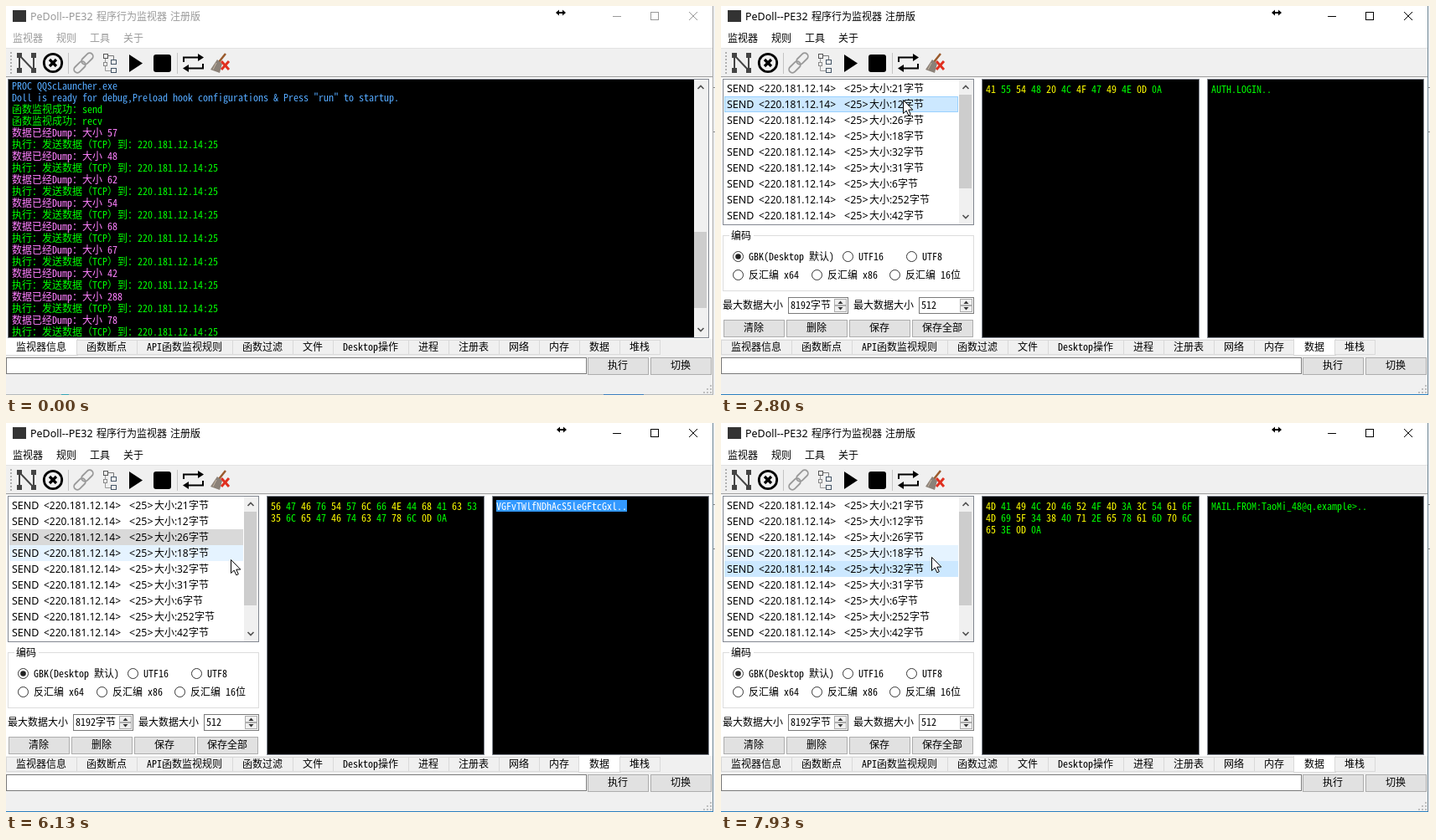
An HTML page with a canvas for the animation above (8 s loop, 846 by 465 pixels).

```html
<!DOCTYPE html>
<html lang="zh-CN">
<head>
<meta charset="utf-8">
<title>PeDoll</title>
<style>
html, body { margin: 0; width: 100%; height: 100%; overflow: hidden; background: #f0f0f0; }
canvas { display: block; }
</style>
</head>
<body>
<canvas id="stage" width="846" height="465"></canvas>
<script>
const ctx = document.getElementById('stage').getContext('2d');
const LOOP = 8000, TICK = 1000 / 15;
const CJK = '12px "Noto Sans CJK SC", "Noto Sans CJK", sans-serif';
const UI = '12px "Noto Sans", "Open Sans", sans-serif';
const TITLE = '12.5px "Noto Sans", "Open Sans", sans-serif';
const MONO = halfWidthFont();

const EMAIL = 'TaoMi_48@q.example';
const LOGIN = 'AUTH LOGIN\r\n';
const USER = btoa(EMAIL) + '\r\n';
const MAIL = `MAIL FROM:<${EMAIL}>\r\n`;
const TABS = ['监视器信息', '函数断点', 'API函数监视规则', '函数过滤', '文件', 'Desktop操作',
  '进程', '注册表', '网络', '内存', '数据', '堆栈'];
const DUMPS = [57, 48, 62, 54, 68, 67, 42, 288, 78];
const PACKETS = [21, 12, 26, 18, 32, 31, 6, 252, 42];

// pointer stops: tick, x, y
const PATH = [[6, 773, 470], [15, 710, 413], [29, 710, 413], [42, 217, 112], [55, 217, 112],
  [59, 217, 134], [70, 217, 134], [80, 777, 100], [81, 777, 100], [86, 554, 104],
  [89, 554, 104], [92, 268, 163], [99, 247, 173], [104, 247, 173], [109, 757, 108],
  [114, 420, 205], [117, 250, 184], [119, 251, 160]];

let pointer = { x: 0, y: 0 };

// the CJK mono face has 6 px Latin letters at 12 px; without it use a smaller mono face
function halfWidthFont() {
  const cjkMono = '12px "Noto Sans Mono CJK SC", monospace';
  ctx.font = cjkMono;
  return Math.abs(ctx.measureText('M').width - 6) < .1 ? cjkMono : '10px "DejaVu Sans Mono", monospace';
}

function pointerAt(tick) {
  const i = PATH.findIndex(p => p[0] >= tick);
  if (i <= 0) return { x: PATH[0][1], y: PATH[0][2] };
  const [t0, x0, y0] = PATH[i - 1], [t1, x1, y1] = PATH[i];
  const u = (tick - t0) / (t1 - t0), e = u * u * (3 - 2 * u);
  return { x: Math.round(x0 + (x1 - x0) * e), y: Math.round(y0 + (y1 - y0) * e) };
}

const over = (x, y, w, h) =>
  pointer.x >= x && pointer.x < x + w && pointer.y >= y && pointer.y < y + h;

function rect(x, y, w, h, color) {
  ctx.fillStyle = color;
  ctx.fillRect(x, y, w, h);
}

function box(x, y, w, h, fill, border) {
  rect(x, y, w, h, border);
  rect(x + 1, y + 1, w - 2, h - 2, fill);
}

function line(points, color, width = 1, close = false) {
  ctx.beginPath();
  points.forEach(([x, y]) => ctx.lineTo(x, y));
  if (close) ctx.closePath();
  ctx.strokeStyle = color;
  ctx.lineWidth = width;
  ctx.stroke();
}

function poly(points, color) {
  ctx.beginPath();
  points.forEach(([x, y]) => ctx.lineTo(x, y));
  ctx.fillStyle = color;
  ctx.fill();
}

function ring(x, y, r, color, width, fill) {
  ctx.beginPath();
  ctx.arc(x, y, r, 0, 7);
  if (fill) { ctx.fillStyle = fill; ctx.fill(); }
  ctx.strokeStyle = color;
  ctx.lineWidth = width;
  ctx.stroke();
}

function put(str, x, y, color, font) {
  ctx.font = font;
  ctx.fillStyle = color;
  ctx.fillText(str, x, y);
}

// fixed grid text: 12 px ideographs, 6 px Latin
const cells = str => [...str].reduce((w, c) => w + (c < '\x80' ? 6 : 12), 0);

function text(str, x, y, color = '#000') {
  for (const run of str.match(/[\x00-\x7f]+|[^\x00-\x7f]+/g)) {
    put(run, x, y, color, run[0] < '\x80' ? MONO : CJK);
    x += cells(run);
  }
}

function button(label, x, y, w, h) {
  const hot = over(x, y, w, h);
  box(x, y, w, h, hot ? '#e5f1fb' : '#e1e1e1', hot ? '#0078d7' : '#adadad');
  text(label, x + Math.floor((w - cells(label)) / 2), y + Math.floor(h / 2) + 4);
}

function scrollbar(x, y, h, thumbTop, thumbEnd) {
  const mid = x + 8;
  rect(x, y, 17, h, '#f0f0f0');
  rect(x, thumbTop, 15, thumbEnd - thumbTop, '#cdcdcd');
  line([[mid - 3.5, y + 11], [mid, y + 7.5], [mid + 3.5, y + 11]], '#505050', 1.6);
  const b = y + h - 10;
  line([[mid - 3.5, b - 1], [mid, b + 2.5], [mid + 3.5, b - 1]], '#505050', 1.6);
}

function drawTitle(active) {
  const ink = active ? '#000' : '#999';
  rect(0, 0, 843, 51, '#fff');
  rect(8, 5, 16, 14, '#333');
  put('PeDoll--PE32', 29, 17, ink, TITLE);
  put('程序行为监视器', 108, 17, ink, CJK);
  put('注册版', 196, 17, ink, CJK);
  rect(724, 12, 10, 1, ink);
  box(769, 7, 10, 10, '#fff', ink);
  line([[815, 7], [825, 17]], ink);
  line([[825, 7], [815, 17]], ink);
  [['监视器', 8], ['规则', 60], ['工具', 100], ['关于', 140]]
    .forEach(([label, x]) => put(label, x, 43, ink, CJK));

  const x = active ? 663 : 662;
  rect(x - 4, 7, 8, 2, '#000');
  poly([[x - 6, 8], [x - 2, 4.5], [x - 2, 11.5]], '#000');
  poly([[x + 6, 8], [x + 2, 4.5], [x + 2, 11.5]], '#000');
}

function drawToolbar() {
  rect(0, 50, 843, 36, '#f0f0f0');
  rect(0, 50, 843, 1, '#e3e3e3');
  rect(0, 84, 843, 1, '#a0a0a0');
  for (let y = 55; y < 82; y += 4) rect(5, y, 2, 2, '#b0b0b0');
  [74, 204].forEach(x => rect(x, 56, 1, 25, '#c4c4c4'));

  line([[16, 77], [16, 59], [33, 77], [33, 59]], '#444', 2);
  [[16, 59], [16, 77], [33, 59], [33, 77]].forEach(([a, b]) => rect(a - 3, b - 3, 6, 6, '#444'));

  ring(56, 68, 10.7, '#000', 2.8);
  line([[52, 64], [60, 72]], '#000', 3.2);
  line([[60, 64], [52, 72]], '#000', 3.2);

  [[97, 63], [88, 73]].forEach(([a, b]) => {
    ctx.save();
    ctx.translate(a, b);
    ctx.rotate(-Math.PI / 4);
    ctx.beginPath();
    ctx.roundRect(-8, -4, 16, 8, 4);
    ctx.strokeStyle = '#999';
    ctx.lineWidth = 1.8;
    ctx.stroke();
    ctx.restore();
  });

  line([[122, 59.5], [128.5, 59.5], [128.5, 65]], '#777');
  line([[118.5, 63], [118.5, 77.5], [125, 77.5]], '#999');
  box(116, 57, 6, 6, '#f0f0f0', '#555');
  box(116, 67, 5, 5, '#f0f0f0', '#888');
  box(125, 64, 7, 6, '#f0f0f0', '#456');
  box(125, 74, 7, 6, '#f0f0f0', '#456');

  poly([[147, 58], [163, 68.5], [147, 79]], '#000');
  ctx.beginPath();
  ctx.roundRect(176, 58, 21, 21, 3);
  ctx.fillStyle = '#000';
  ctx.fill();

  line([[212, 67], [212, 61.5], [231, 61.5]], '#000', 2);
  poly([[229, 57], [236, 61.5], [229, 66]], '#000');
  line([[235, 69], [235, 74.5], [216, 74.5]], '#000', 2);
  poly([[218, 70], [211, 74.5], [218, 79]], '#000');

  line([[262, 57], [254, 67]], '#9a5a2c', 2.5);
  poly([[252, 64], [258, 69], [255, 80], [244, 76]], '#8b8178');
  line([[251, 68], [247, 76]], '#c9b8a4', 1);
  line([[257, 66], [266, 76]], '#e03020', 3);
  line([[266, 66], [257, 76]], '#e03020', 3);
}

function drawLog() {
  rect(0, 86, 843, 312, '#fff');
  box(2, 87, 837, 310, '#000', '#828790');
  scrollbar(821, 88, 308, 270, 361);
  ctx.save();
  ctx.beginPath();
  ctx.rect(3, 88, 818, 308);
  ctx.clip();
  const rows = [
    ['PROC QQScLauncher.exe', '#55aaff'],
    ['Doll is ready for debug,Preload hook configurations & Press "run" to startup.', '#55aaff'],
    ['函数监视成功：send', '#00ff00'],
    ['函数监视成功：recv', '#00ff00']
  ];
  DUMPS.forEach(n => rows.push(['数据已经Dump：大小 ' + n, '#ff80ff'],
    ['执行：发送数据（TCP）到：220.181.12.14:25', '#00ff00']));
  rows.forEach(([str, color], i) => text(str, 7, 100 + 14 * i, color));
  ctx.restore();
}

function drawPackets(selected, focused) {
  box(2, 87, 300, 175, '#fff', '#828790');
  ctx.save();
  ctx.beginPath();
  ctx.rect(3, 88, 298, 173);
  ctx.clip();
  PACKETS.forEach((size, i) => {
    const y = 89 + 19 * i, hot = over(4, y, 279, 19);
    if (i === selected) {
      const fill = focused ? '#cce8ff' : '#d9d9d9';
      box(4, y, 279, 19, fill, hot && focused ? '#99d1ff' : fill);
    } else if (hot) rect(4, y, 279, 19, '#e5f3ff');
    const base = y + 14;
    put('SEND', 7, base, '#000', TITLE);
    put('<220.181.12.14>', 45, base, '#000', UI);
    put('<25>', 147, base, '#000', TITLE);
    put('大小', 177, base, '#000', CJK);
    put(':', 201, base, '#000', UI);
    put(size, 204, base, '#000', UI);
    put('字节', 204 + 7 * String(size).length, base, '#000', CJK);
  });
  ctx.restore();
  scrollbar(284, 88, 173, 106, 218);
}

function radio(label, x, y, checked) {
  ring(x + .5, y + .5, 6, '#333', 1, '#fff');
  if (checked) {
    ctx.beginPath();
    ctx.arc(x + .5, y + .5, 3.3, 0, 7);
    ctx.fillStyle = '#222';
    ctx.fill();
  }
  text(label, x + 13, y + 5);
}

function spin(value, x, w) {
  box(x, 348, w, 20, '#fff', '#7a7a7a');
  text(value, x + 3, 362);
  const bx = x + w - 17, mid = bx + 7.5;
  box(bx, 350, 15, 8, '#f0f0f0', '#adadad');
  box(bx, 358, 15, 8, '#f0f0f0', '#adadad');
  poly([[mid - 3, 356], [mid, 352.5], [mid + 3, 356]], '#333');
  poly([[mid - 3, 360], [mid, 363.5], [mid + 3, 360]], '#333');
}

function drawOptions() {
  box(2, 274, 300, 67, '#fff', '#dcdcdc');
  rect(10, 272, 29, 6, '#fff');
  text('编码', 12, 279);
  radio('GBK(Desktop 默认)', 20, 299, true);
  radio('UTF16', 151, 299);
  radio('UTF8', 227, 299);
  radio('反汇编 x64', 20, 321);
  radio('反汇编 x86', 114, 321);
  radio('反汇编 16位', 207, 321);
  text('最大数据大小', 2, 362);
  spin('8192字节', 80, 72);
  text('最大数据大小', 158, 362);
  spin('512', 236, 66);
  ['清除', '删除', '保存', '保存全部'].forEach((label, i) => button(label, 3 + 75 * i, 375, 73, 21));
}

function drawBytes(data, selectFrom, focused) {
  box(311, 87, 260, 310, '#000', '#828790');
  box(580, 87, 259, 310, '#000', '#828790');
  [...data].forEach((c, i) => {
    const hex = c.charCodeAt(0).toString(16).toUpperCase().padStart(2, '0');
    text(hex, 316 + 18 * (i % 14), 104 + 14 * Math.floor(i / 14), i % 2 ? '#00ff00' : '#ffff00');
  });
  const shown = data.replace(/\s/g, '.').replace('<', '');
  if (selectFrom > 0) text(shown.slice(0, selectFrom), 585, 104, '#00ff00');
  if (selectFrom < shown.length) {
    const x = 585 + 6 * selectFrom;
    rect(x, 92, 6 * (shown.length - selectFrom), 14, focused ? '#3399ff' : '#f0f0f0');
    text(shown.slice(selectFrom), x, 104, focused ? '#fff' : '#000');
  }
}

function drawData(tick) {
  const data = tick < 65 ? LOGIN : tick < 105 ? USER : MAIL;
  const selecting = tick >= 82 && tick < 105;
  const dragX = tick < 86 ? pointer.x : 585;
  const from = selecting ? Math.max(0, Math.min(data.length, Math.round((dragX - 585) / 6))) : data.length;
  const listFocus = tick < 82 || tick >= 102;
  rect(0, 86, 843, 312, '#fff');
  drawPackets(tick < 62 ? 1 : tick < 102 ? 2 : 4, listFocus);
  drawOptions();
  drawBytes(data, from, !listFocus);
}

function drawTabs(selected) {
  rect(0, 398, 843, 67, '#f0f0f0');
  let x = 0;
  TABS.forEach((label, i) => {
    const w = cells(label) + 24;
    if (i === selected) {
      box(x - 1, 398, w + 3, 20, '#fff', '#d9d9d9');
      rect(x, 398, w + 1, 2, '#fff');
    } else box(x, 399, w + 1, 18, over(x, 399, w, 18) ? '#d8eaf9' : '#f0f0f0', '#d9d9d9');
    text(label, x + 12, 412);
    x += w;
  });
}

function drawFooter(active) {
  box(0, 420, 693, 20, '#fff', '#7a7a7a');
  button('执行', 694, 420, 73, 21);
  button('切换', 769, 420, 73, 21);
  for (let r = 0; r < 3; r++)
    for (let c = 2 - r; c < 3; c++) rect(832 + 4 * c, 453 + 4 * r, 2, 2, '#bfbfbf');
  rect(843, 0, 1, 465, active ? '#6f8796' : '#aaa');
  rect(844, 0, 2, 465, '#eef0f2');
  [97, 150].forEach(y => rect(844, y, 2, 1, '#888'));
  rect(0, 464, 844, 1, active ? '#2a7fc0' : '#b4b8bb');
  if (!active) {
    rect(66, 464, 9, 1, '#35a5b5');
    rect(713, 464, 48, 1, '#3d7fc0');
  }
}

function drawPointer(tick) {
  if (tick < 7) return;
  const { x, y } = pointer;
  if (tick >= 26 && (over(312, 88, 258, 308) || over(581, 88, 257, 308))) {
    rect(x, y - 8, 1, 16, '#fff');
    [-9, 8].forEach(d => { rect(x - 3, y + d, 3, 1, '#fff'); rect(x + 1, y + d, 3, 1, '#fff'); });
    return;
  }
  const arrow = [[0, 0], [0, 16], [3.7, 12.6], [6.3, 18.3], [8.8, 17.2], [6.3, 11.6], [11.3, 11.6]]
    .map(([a, b]) => [x + .5 + a, y + .5 + b]);
  poly(arrow, '#fff');
  line(arrow, '#000', 1, true);
}

function render(ms) {
  const tick = Math.floor((ms % LOOP + 4) / TICK) % 120;
  const active = tick >= 25, dataTab = tick >= 26;
  pointer = pointerAt(tick);
  rect(0, 0, 846, 465, '#f0f0f0');
  drawTitle(active);
  drawToolbar();
  if (dataTab) drawData(tick); else drawLog();
  drawTabs(dataTab ? 10 : 0);
  drawFooter(active);
  drawPointer(tick);
}

let start;
function loop(now) {
  start ??= now;
  render(now - start);
  requestAnimationFrame(loop);
}
render(0);
requestAnimationFrame(loop);
</script>
</body>
</html>
```
